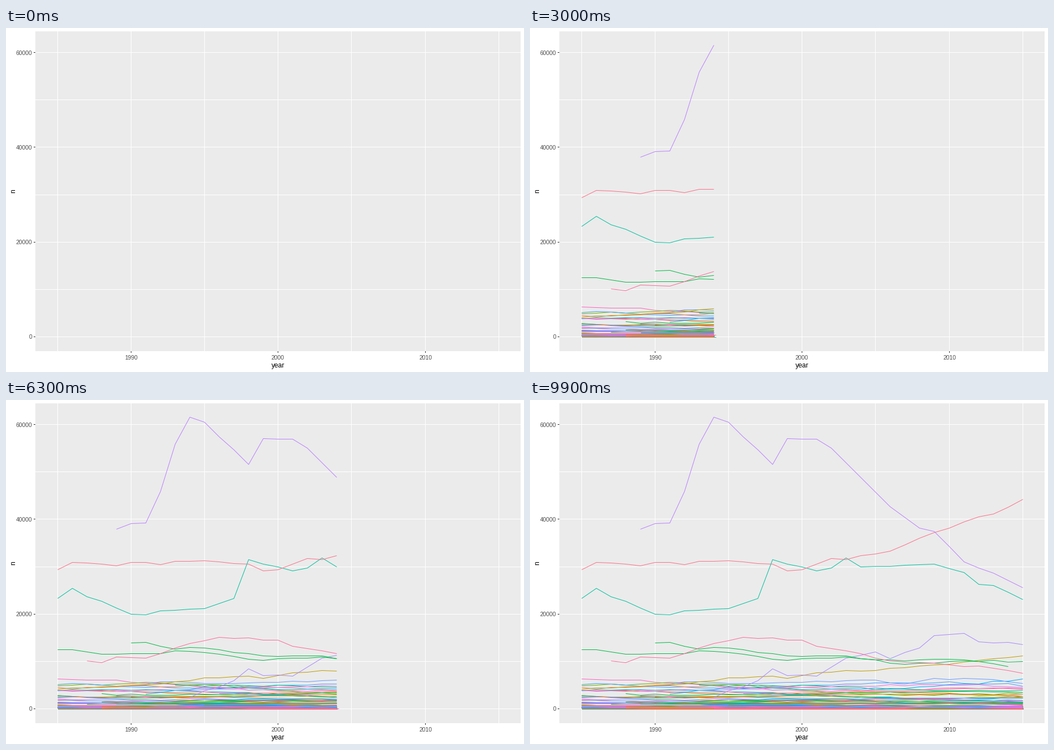
A matplotlib script for the animation above (10000 ms loop, 917 by 611 pixels).

```python
import numpy as np
import matplotlib.pyplot as plt
from matplotlib.animation import FuncAnimation
from matplotlib.patches import Rectangle

W, H, DPI = 917, 611, 100
FRAMES, STEP = 100, 100
FIRST, LAST = 1985, 2015
PX = 72 / DPI  # one pixel in points
rng = np.random.default_rng(7)


def hcl(hue, chroma=100, light=65):
    """Polar LUV colour, as in the default discrete hue palette."""
    h = np.radians(hue)
    u = chroma * np.cos(h) / (13 * light) + 0.1978
    v = chroma * np.sin(h) / (13 * light) + 0.4683
    y = ((light + 16) / 116) ** 3
    xyz = np.array([9 * y * u / (4 * v), y, y * (12 - 3 * u - 20 * v) / (4 * v)])
    lin = np.array([[3.2406, -1.5372, -0.4986],
                    [-0.9689, 1.8758, 0.0415],
                    [0.0557, -0.2040, 1.0570]]) @ xyz
    lin = np.clip(lin, 0, 1)
    rgb = np.where(lin > 0.0031308, 1.055 * lin ** (1 / 2.4) - 0.055, 12.92 * lin)
    return tuple(np.clip(rgb, 0, 1))


def pixel(v):
    """Centre of the pixel that holds v."""
    return np.floor(v) + 0.5


def px(year):
    return pixel(91.5 + 26.02 * (np.asarray(year) - FIRST))


def py(n):
    """Vertical pixel of a count given in thousands."""
    return pixel(548.6 - 8.418 * np.asarray(n))


fig = plt.figure(figsize=(W / DPI, H / DPI), dpi=DPI, facecolor="white")
ax = fig.add_axes([0, 0, 1, 1])
ax.set(xlim=(0, W), ylim=(H, 0))
ax.axis("off")
ax.add_patch(Rectangle((52, 6), 859, 568, color="#EBEBEB", lw=0))


def rule(x, y, w, h, color):
    ax.add_patch(Rectangle((np.floor(x), np.floor(y)), w, h, color=color, lw=0))


def label(x, y, text, size, color, ha="center", **kw):
    ax.text(x, y, text, fontsize=size * PX, color=color, ha=ha, va="baseline",
            family=["Liberation Sans", "DejaVu Sans"], **kw)


for year in range(FIRST, LAST + 1, 5):
    x = px(year)
    rule(x, 6, 1, 568, "white")
    if year % 10 == 0:
        rule(x, 574, 1, 3, "#333333")
        label(x, 589, str(year), 10.2, "#4D4D4D")
for n in range(0, 61, 10):
    y = py(n)
    rule(52, y, 859, 1, "white")
    if n % 20 == 0:
        rule(49, y, 3, 1, "#333333")
        label(46, y + 4, str(n * 1000), 10.2, "#4D4D4D", ha="right")
label(481.8, 603, "year", 12, "black")
label(16, 290, "n", 12, "black", rotation=90, rotation_mode="anchor")

lines = []


def add(hue, years, counts):
    line, = ax.plot([], [], color=hcl(hue), lw=PX, solid_capstyle="butt")
    # each year lands on a whole frame, the head moves evenly in between
    due = np.rint((years - FIRST) * (FRAMES - 1) / (LAST - FIRST))
    lines.append((line, due, px(years), py(counts)))


def path(hue, *keys):
    """Yearly line through a few (year, thousands) turning points."""
    at, n = zip(*keys)
    years = np.arange(at[0], at[-1] + 1)
    wobble = np.where(np.isin(years, at), 0, rng.normal(0, 0.1, len(years)))
    add(hue, years, np.interp(years, at, n) + wobble)


# Small groups: evenly shrinking levels, hues spread by the golden angle
for i in range(90):
    level = 5.7 * 0.945 ** i
    late = i > 2 and rng.random() < 0.35
    years = np.arange(rng.integers(1987, 1997) if late else FIRST, LAST + 1)
    swing = 0.12 * np.sin(years / rng.uniform(2.5, 6) + rng.uniform(0, 6))
    fade = 1 - 0.012 * (years - FIRST) * rng.uniform(-0.4, 1.4)
    counts = level * (fade + swing + rng.normal(0, 0.025, len(years)))
    keep = (rng.random(len(years)) > 0.1) | (i < 50)
    keep[[0, -1]] = True
    add((335 + 137.5 * i) % 360, years[keep], counts[keep])

# The groups that stand out
path(237, (1991, 3.1), (1995, 4.6), (2000, 4.1), (2007, 4.3), (2015, 6.25))
path(257, (1990, 5.0), (1992, 5.7), (1996, 5.4), (2005, 6.05), (2007, 5.25),
     (2009, 6.45), (2013, 6.2), (2015, 5.4))
path(70, (1985, 4.15), (1991, 5.05), (1994, 5.9), (1995, 6.5), (1998, 6.95),
     (1999, 6.45), (2001, 7.65), (2004, 7.95), (2010, 9.35), (2012, 10.25),
     (2015, 11.15))
path(273, (1994, 2.4), (1997, 5.95), (1998, 8.5), (1999, 7.0), (2001, 6.95),
     (2003, 10.75), (2005, 12.0), (2006, 10.6), (2008, 12.9), (2009, 15.4),
     (2011, 15.9), (2012, 14.1), (2015, 13.55))
path(138, (1985, 12.5), (1986, 12.5), (1988, 11.55), (1992, 11.65),
     (1993, 12.2), (1995, 11.85), (1999, 10.2), (2003, 10.9), (2007, 10.1),
     (2009, 10.5), (2011, 10.4), (2014, 8.95))
path(138, (1990, 13.9), (1991, 14.0), (1993, 12.65), (1995, 12.9),
     (1999, 11.2), (2003, 11.15), (2007, 9.35), (2010, 10.0), (2015, 10.0))
path(356, (1987, 10.1), (1988, 9.75), (1989, 10.9), (1991, 10.75),
     (1994, 13.8), (1996, 15.15), (2000, 14.45), (2001, 13.15), (2003, 12.25),
     (2006, 10.05), (2012, 9.0), (2015, 7.55))
path(175, (1985, 23.3), (1986, 25.45), (1987, 23.6), (1988, 22.7),
     (1990, 20.0), (1991, 19.8), (1992, 20.7), (1995, 21.2), (1997, 23.3),
     (1998, 31.5), (2001, 29.15), (2002, 29.7), (2003, 31.85), (2004, 30.0),
     (2009, 30.55), (2011, 28.75), (2012, 26.3), (2013, 26.0), (2015, 23.1))
path(4, (1985, 29.4), (1986, 30.95), (1989, 30.2), (1990, 30.95),
     (1992, 30.45), (1993, 31.1), (1995, 31.3), (1998, 30.55), (1999, 29.15),
     (2000, 29.3), (2002, 31.7), (2003, 31.5), (2006, 33.3), (2008, 36.05),
     (2012, 40.55), (2013, 41.1), (2015, 44.15))
path(280, (1989, 37.9), (1990, 39.1), (1991, 39.25), (1992, 45.9),
     (1993, 55.8), (1994, 61.5), (1995, 60.5), (1998, 51.55), (1999, 57.0),
     (2001, 56.9), (2002, 55.0), (2006, 42.65), (2008, 38.2), (2009, 37.45),
     (2011, 31.0), (2013, 28.7), (2015, 25.5))


def draw(frame):
    for line, due, xs, ys in lines:
        if frame <= due[0]:
            line.set_data([], [])
            continue
        past = due <= frame
        line.set_data(np.append(xs[past], np.interp(frame, due, xs)),
                      np.append(ys[past], np.interp(frame, due, ys)))
    return [item[0] for item in lines]


anim = FuncAnimation(fig, draw, frames=FRAMES, interval=STEP,
                     repeat=True, repeat_delay=0, blit=False)
plt.show()
```
